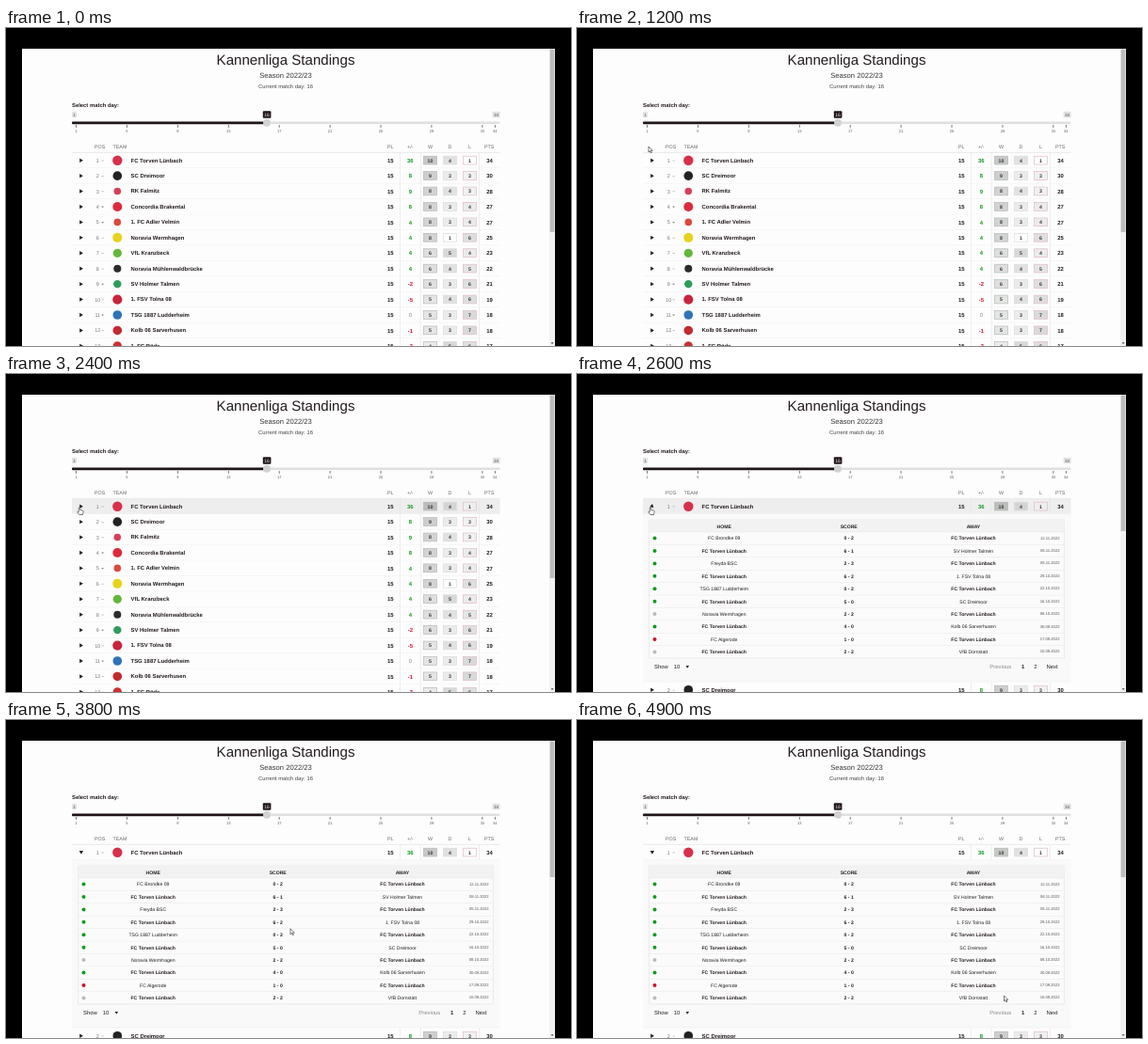
These frames come from a looping animation (600x338 px, 5 s). An HTML page:

```html
<!DOCTYPE html>
<html lang="en">
<head>
<meta charset="utf-8">
<title>League standings</title>
<style>
  html, body { margin: 0; width: 100%; height: 100%; overflow: hidden; background: #000; }
  svg { display: block; width: 600px; height: 338px; }
  text { font-family: "Liberation Sans", Arial, sans-serif; text-rendering: geometricPrecision; }
</style>
</head>
<body>
<svg id="stage" viewBox="0 0 600 338" xmlns="http://www.w3.org/2000/svg"></svg>
<script>
const LOOP = 5000, ROW = 16.43, TOP = 140.5, SHIFT = 178.6;
const INK = '#241c1e', DIM = '#666', GREEN = '#129a1e', RED = '#d5152f';
const LEADER = 'FC Torven Lünbach';

// team, badge colour, badge radius, trend, goal difference, W, D, L
const teams = [
  [LEADER, '#d7304a', 5.2, 0, 36, 10, 4, 1],
  ['SC Dreimoor', '#222', 4.8, 0, 8, 9, 3, 3],
  ['RK Falmitz', '#d8405a', 3.8, 0, 9, 8, 4, 3],
  ['Concordia Brakental', '#dc2c3c', 5, -1, 8, 8, 3, 4],
  ['1. FC Adler Velmin', '#dc4a3c', 3.8, -1, 4, 8, 3, 4],
  ['Noravia Wermhagen', '#e8d21c', 5, 0, 4, 8, 1, 6],
  ['VfL Kranzbeck', '#62b83a', 4.6, 0, 4, 6, 5, 4],
  ['Noravia Mühlenwaldbrücke', '#2b2b2b', 4, 0, 4, 6, 4, 5],
  ['SV Holmer Talmen', '#2f9d5c', 4.2, -1, -2, 6, 3, 6],
  ['1. FSV Tolna 08', '#c8243c', 5.1, 0, -5, 5, 4, 6],
  ['TSG 1887 Ludderheim', '#2f73b8', 4.8, -1, 0, 5, 3, 7],
  ['Kolb 06 Sarverhusen', '#c32a30', 4.8, 0, -1, 5, 3, 7],
  ['1. FC Röde', '#cc3030', 4.6, 0, -3, 4, 5, 6]
];

// result, home, score, away, date
const games = [
  ['w', 'FC Brondke 09', '0 - 2', LEADER, '12.11.2022'],
  ['w', LEADER, '6 - 1', 'SV Holmer Talmen', '08.11.2022'],
  ['w', 'Freyda BSC', '2 - 3', LEADER, '05.11.2022'],
  ['w', LEADER, '6 - 2', '1. FSV Tolna 08', '29.10.2022'],
  ['w', 'TSG 1887 Ludderheim', '0 - 2', LEADER, '22.10.2022'],
  ['w', LEADER, '5 - 0', 'SC Dreimoor', '16.10.2022'],
  ['d', 'Noravia Wermhagen', '2 - 2', LEADER, '08.10.2022'],
  ['w', LEADER, '4 - 0', 'Kolb 06 Sarverhusen', '30.09.2022'],
  ['l', 'FC Algerode', '1 - 0', LEADER, '17.09.2022'],
  ['d', LEADER, '2 - 2', 'VfB Dornstatt', '10.09.2022']
];

// y is the middle of the capitals
function text(x, y, str, size, { fill = INK, bold = false, at = 'middle' } = {}) {
  return `<text x="${x}" y="${(y + size * 0.358).toFixed(2)}" font-size="${size}" fill="${fill}"` +
    ` text-anchor="${at}" font-weight="${bold ? 700 : 400}">${str}</text>`;
}
const rect = (x, y, w, h, fill, extra = '') =>
  `<rect x="${x}" y="${y}" width="${w}" height="${h}" fill="${fill}" ${extra}/>`;
const circle = (x, y, r, fill) => `<circle cx="${x}" cy="${y}" r="${r}" fill="${fill}"/>`;
const path = (d, fill = INK, extra = '') => `<path d="${d}" fill="${fill}" ${extra}/>`;

function heading() {
  return text(297, 33.8, 'Kannenliga Standings', 15.1) +
    text(297, 50.4, 'Season 2022/23', 7.65, { fill: '#3a3436' }) +
    text(297, 62, 'Current match day: 16', 5.87, { fill: '#4a4446' }) +
    text(70, 82.2, 'Select match day:', 5.88, { bold: true, at: 'start' });
}

function slider() {
  const pos = day => 74.5 + (day - 1) * 13.48;
  let s = rect(70, 88.8, 5, 6.4, '#e3e3e3', 'rx="1"') + text(72.5, 92, '1', 4.7, { fill: '#555' }) +
    rect(516.5, 88.8, 8.2, 6.4, '#e3e3e3', 'rx="1"') + text(520.6, 92, '34', 4.7, { fill: '#555' }) +
    rect(70, 99.6, 454.5, 2.4, '#e0e0e0', 'rx="1"') + rect(70, 99.4, 207, 2.8, '#20161a', 'rx="1"') +
    rect(272.8, 88.3, 8.6, 7.4, '#20161a', 'rx="1"') + text(277.1, 92.1, '16', 5, { fill: '#eee' }) +
    circle(277, 100.7, 4, '#d2d2d2');
  for (const day of [1, 5, 9, 13, 17, 21, 25, 29, 33, 34])
    s += rect(pos(day) - 0.4, 103, 0.8, 2.8, '#555') + text(pos(day), 110, day, 4, { fill: '#555' });
  return s;
}

function tableHead() {
  const cols = [[99.7, 'POS'], [408.2, 'PL'], [429.3, '+/-'], [450.5, 'W'], [471.5, 'D'], [492.5, 'L'], [513.2, 'PTS']];
  return text(113.5, 126.2, 'TEAM', 5.35, { fill: DIM, at: 'start' }) +
    cols.map(([x, label]) => text(x, 126.2, label, 5.35, { fill: DIM })).join('') +
    rect(70, 131.9, 454.5, 0.6, '#dcdcdc');
}

function chip(x, y, n, max, shade, border) {
  return rect(x - 7, y - 4.3, 14, 8.8, `rgba(0,0,0,${(shade * (n - 1) / (max - 1)).toFixed(3)})`,
    `stroke="${border}" stroke-width=".7"`) + text(x, y + 0.2, n, 5.2, { bold: true, fill: '#333' });
}

function teamRow([name, color, r, trend, diff, w, d, l], i) {
  const y = TOP + i * ROW, bold = true;
  const tri = `<g transform="translate(79.9 ${y + 0.2})">` +
    path('M-1.7-2.2L2 0L-1.7 2.2Z', INK, i ? '' : 'id="tri"') + '</g>';
  const mark = trend
    ? path(`M101.2 ${y - 0.2}h2.8l-1.4 1.7Z`, '#888')
    : rect(101.4, y + 0.2, 2.6, 0.6, '#aaa');
  const rules = [418.2, 439.8, 502.3].map(x => rect(x, y - 8.2, 0.6, ROW, '#e4e4e4')).join('');
  return rect(70, y + 8, 454.5, 0.5, '#efefef') + rules +
    tri + text(97.3, y + 0.2, i + 1, 5.5, { fill: '#777' }) + mark + circle(118.3, y + 0.2, r, color) +
    text(132.6, y, name, 5.9, { bold, at: 'start' }) + text(408.2, y + 0.2, 15, 5.9, { bold }) +
    text(429.3, y + 0.2, diff, 5.9, { bold: diff !== 0, fill: diff > 0 ? GREEN : diff < 0 ? RED : '#888' }) +
    chip(450.5, y, w, 10, 0.21, '#b2bcb2') + chip(471.5, y, d, 6, 0.18, '#dcdcdc') +
    chip(492.5, y, l, 7, 0.14, '#e0bcc4') +
    text(513.5, y + 0.2, w * 3 + d, 5.9, { bold });
}

function details() {
  const step = 13.42, dots = { w: GREEN, d: '#b9b9c0', l: '#cf1027' };
  let s = rect(70, 148.8, 454.5, 178, '#f9f9f9') +
    rect(76.8, 155, 440.4, 147, '#fbfbfb', 'stroke="#e2e2e2" stroke-width=".6"') +
    rect(76.8, 155, 440.4, 13, '#f2f2f2');
  for (const [x, label] of [[156.2, 'HOME'], [288.7, 'SCORE'], [421, 'AWAY']])
    s += text(x, 161.7, label, 5.1, { bold: true });
  games.forEach(([result, home, score, away, date], i) => {
    const y = 174.6 + i * step;
    s += rect(76.8, y - 6.9, 440.4, 0.5, '#e6e6e6') + circle(82.5, y, 2, dots[result]) +
      text(156.2, y, home, 5.1, { bold: home === LEADER }) +
      text(288.7, y, score, 5.1, { bold: true }) +
      text(421, y, away, 5.1, { bold: away === LEADER }) +
      text(512.6, y - 0.5, date, 4.2, { fill: '#555', at: 'end' });
  });
  const at = 'start';
  return s + text(82, 311.2, 'Show', 5.9, { at }) + text(102.8, 311.2, '10', 5.9, { at }) +
    path('M115.6 309.9h3.4l-1.7 2.8Z') + text(438.3, 311.2, 'Previous', 5.9, { at, fill: '#8a8a8a' }) +
    text(473.6, 311.2, '1', 5.9, { bold: true }) + text(487, 311.2, '2', 5.9) +
    text(498.6, 311.2, 'Next', 5.9, { at }) + rect(70, 326.7, 454.5, 0.5, '#e6e6e6');
}

const scrollbar = rect(577.2, 22, 5.8, 316, '#f1f1f1') +
  rect(577.6, 22.5, 4.8, 194.5, '#bdbdbd', 'id="thumb"') +
  path('M578.6 334.2h3l-1.5 1.8Z', '#444');

const outline = 'stroke="#222" stroke-width=".6" stroke-linejoin="round"';
const pointers =
  path('M0 0V5.9L1.4 4.7L2.4 6.9L3.3 6.5L2.4 4.4L4.3 4.3Z', '#fff', `id="arrow" ${outline}`) +
  path('M0 0.6Q0.7-0.5 1.4 0.6V3L4.4 3.8Q5 4 4.8 5.2L4.2 8H0.5L-1.6 5.2Q-1.5 4 0 5Z', '#fff', `id="hand" ${outline}`);

const $ = id => document.getElementById(id);
const rows = teams.map(teamRow);
$('stage').innerHTML = rect(17, 22, 566, 316, '#fdfdfd') + heading() + slider() + tableHead() +
  rect(70, 132.5, 454.5, 16.2, '#eeeeee', 'id="hover"') + rows[0] +
  `<g id="rest">${rows.slice(1).join('')}</g><g id="details">${details()}</g>` + scrollbar + pointers;

// time, x, y
const moves = [
  [600, 282, 21], [700, 202, 71], [900, 146, 98], [1000, 128, 111], [1200, 76, 126], [1300, 52.8, 132],
  [1900, 64, 138], [2000, 77.3, 141.5], [2900, 180, 214], [3000, 202, 230], [3500, 270, 222],
  [3600, 301, 219.5], [3800, 302, 221.8], [3900, 419.5, 244], [4100, 414, 235], [4800, 440, 273], [4900, 453.5, 293]
];
const ramp = (t, a, b) => Math.min(1, Math.max(0, (t - a) / (b - a)));
const show = (id, on) => $(id).setAttribute('visibility', on ? 'visible' : 'hidden');

function draw(t) {
  const open = t >= 2600, hand = t >= 2000 && t < 2900;
  const spot = moves.filter(m => m[0] <= t).pop();
  show('details', open);
  $('rest').setAttribute('transform', `translate(0 ${open ? SHIFT : 0})`);
  $('thumb').setAttribute('height', open ? 144.5 : 194.5);
  $('tri').setAttribute('transform', `rotate(${open ? 40 + 50 * ramp(t, 2700, 2900) : 0})`);
  $('hover').setAttribute('opacity', ramp(t, 1950, 2200) * (1 - ramp(t, 2850, 3050)));
  show('arrow', spot && !hand);
  show('hand', hand);
  if (spot) $(hand ? 'hand' : 'arrow').setAttribute('transform', `translate(${spot[1]} ${spot[2]})`);
}

const start = performance.now();
function tick() {
  draw((performance.now() - start) % LOOP);
  requestAnimationFrame(tick);
}
tick();
</script>
</body>
</html>
```
